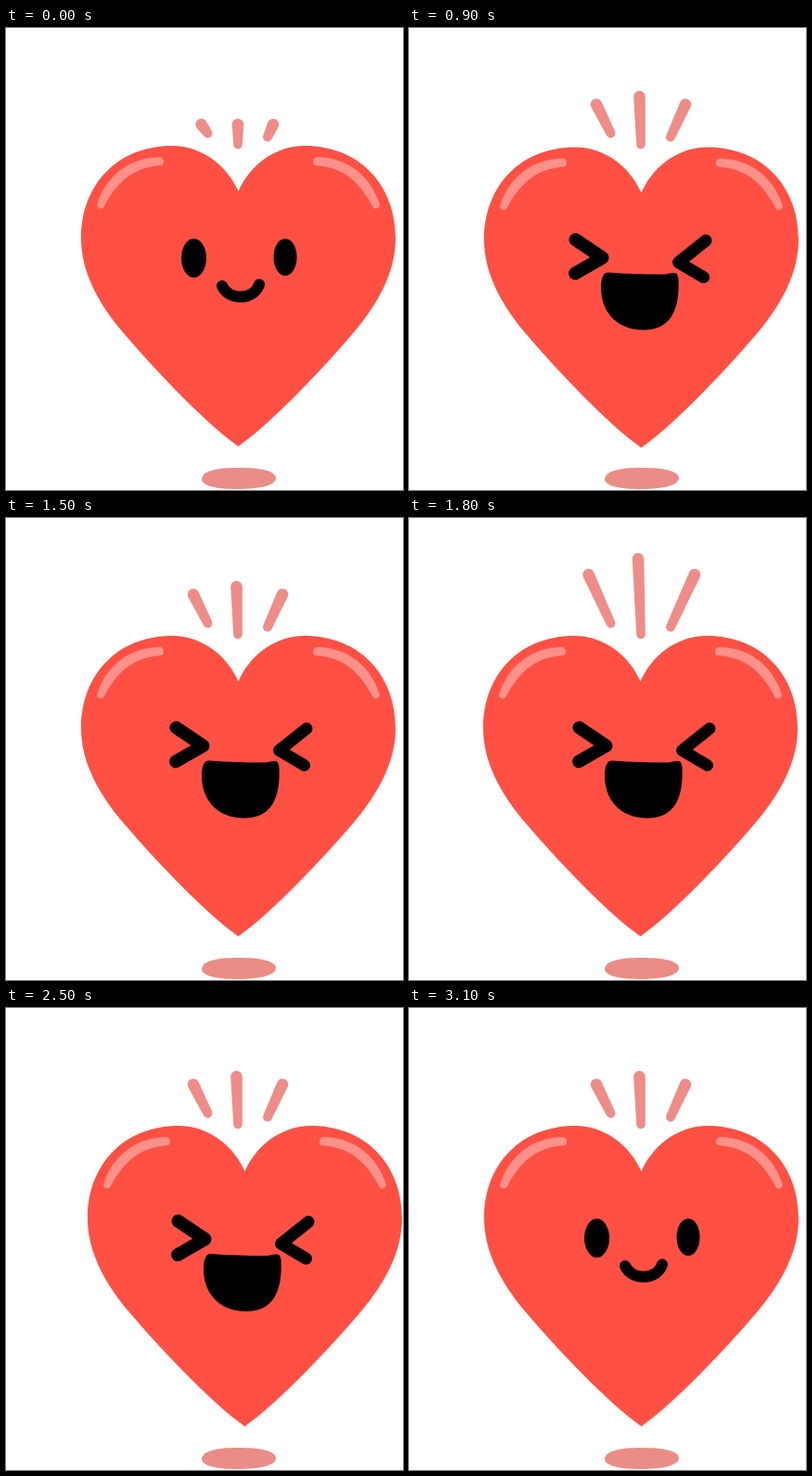
These frames come from a looping animation (428 by 498 pixels, 3200 ms). An HTML page:

```html
<!DOCTYPE html>
<html lang="en">
<head>
<meta charset="utf-8">
<title>Laughing heart</title>
<style>
html, body { margin: 0; width: 100%; height: 100%; overflow: hidden; background: #fff; }
svg { display: block; width: 100%; height: 100%; }
.line { fill: none; stroke: #000; stroke-linecap: round; stroke-linejoin: round; }
</style>
</head>
<body>
<svg viewBox="0 0 428 498">
  <path fill="#eb8c87" d="M211 486C212 477 228 474 250 474C274 474 290 477 291 485C291 493 274 497 250 497C228 497 211 494 211 486Z"/>
  <path id="rays" fill="#ee8d88"/>
  <g id="heart">
    <path fill="#ff5043" d="M250.500 176C262 150 288 127 322 127C380 127 420 168 420 227C420 262 402 296 375 328C340 369 288 424 250.500 451C213 424 161 369 126 328C99 296 81 262 81 227C81 168 121 127 179 127C213 127 239 150 250.500 176Z"/>
    <g fill="#ff918a">
      <path id="shine" d="M98.500 189C108 160 132 140 165 139A5 5 0 0 1 168 148C140 150 122 162 106 192A4 4 0 0 1 98.500 189Z"/>
      <use href="#shine" transform="matrix(-1 0 0 1 501 0)"/>
    </g>
  </g>
  <g id="smile">
    <ellipse cx="202.500" cy="248" rx="13.500" ry="21"/>
    <ellipse cx="301" cy="247" rx="12.500" ry="20"/>
    <path class="line" stroke-width="12" d="M233 278C240 294 267 294 273 276.500"/>
  </g>
  <g id="laugh">
    <path class="line" stroke-width="14" d="M183.500 226L212.500 245.500L183 262.500"/>
    <path class="line" stroke-width="13" d="M324 227L294.500 250.500L321.500 266.500"/>
    <path d="M219 261.500Q246 263.500 280 263.500Q286 261.500 291 262Q294 263 294.500 269C296 302 286 323.500 257 323.500C227 323.500 210 303 211 275Q212 261 219 261.500Z"/>
  </g>
</svg>
<script>
const STEP = 100, COUNT = 32;
const el = id => document.getElementById(id);
const [rays, heart, smile, laugh] = ['rays', 'heart', 'smile', 'laugh'].map(el);

// Round-ended stroke that narrows from radius r to q
function ray(x, y, r, u, v, q) {
  const len = Math.hypot(u - x, v - y), nx = (y - v) / len, ny = (u - x) / len;
  return `M${x + nx * r} ${y + ny * r}A${r} ${r} 0 0 1 ${x - nx * r} ${y - ny * r}` +
    `L${u - nx * q} ${v - ny * q}A${q} ${q} 0 0 1 ${u + nx * q} ${v + ny * q}Z`;
}

// Feet stay put while the tops rise and spread
const burst = g =>
  ray(210.5 - 8.5 * g, 104 - 21.5 * g, 6.3, 217.5, 113.5, 5) +
  ray(250 - 1.5 * g, 104 - 30 * g, 6.3, 250, 125.5, 4.8) +
  ray(288 + 10 * g, 104 - 21.5 * g, 6.3, 282, 117.5, 5);

// Sum of sine harmonics
const wave = (a, ...amps) => amps.reduce((sum, amp, n) => sum + amp * Math.sin((n + 1) * a), 0);

function draw(ms) {
  const i = Math.floor(ms / STEP) % COUNT;
  const happy = i < 2 || i > 29;
  const k = (i + 5) % 12;              // a big swing fills k = 1..7, a small quiver the rest
  const swing = i > 7 && k > 0 && k < 8;
  const a = swing && !happy ? k * Math.PI / 8 : 0;
  const quiver = swing || happy ? 0 : Math.sin((i - 3) * Math.PI / 2);

  rays.setAttribute('d', burst(1 - Math.cos(i * Math.PI / 2)));
  heart.setAttribute('transform', `translate(${wave(a, 1.8, -3.5, 3.1) + quiver} ${wave(a, 2.5, .75, -1.4)})`);
  laugh.setAttribute('transform', `translate(${wave(a, -1.4, -3)} ${wave(a, 4, -.75)})`);
  smile.setAttribute('visibility', happy ? 'visible' : 'hidden');
  laugh.setAttribute('visibility', happy ? 'hidden' : 'visible');
}

const start = performance.now();
function tick() {
  draw(performance.now() - start);
  requestAnimationFrame(tick);
}
tick();
</script>
</body>
</html>
```
